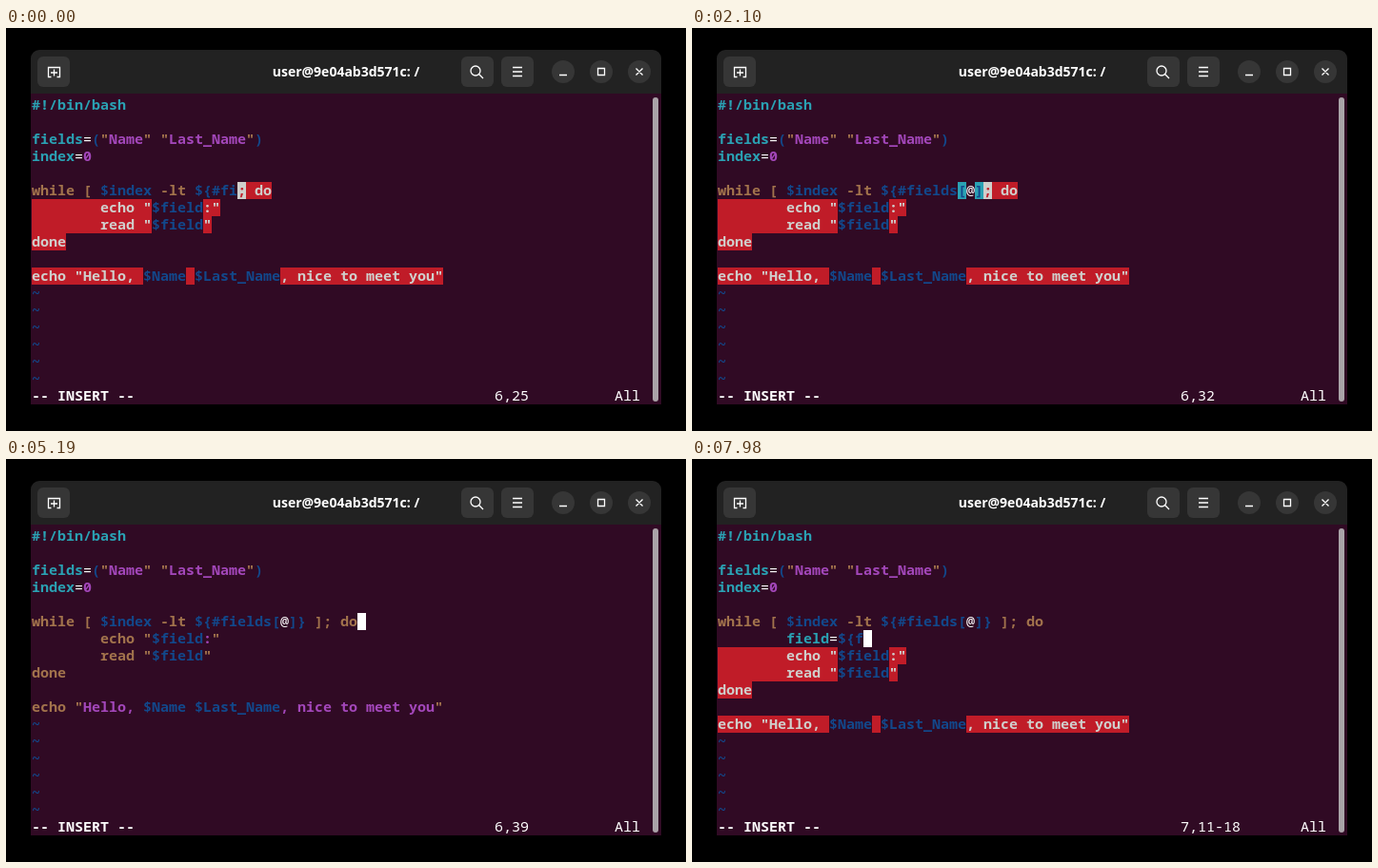
Animation, 714 px wide and 424 px high, one loop 8 s. Source, as an HTML page with a canvas:

```html
<!DOCTYPE html>
<html lang="en">
<head>
<meta charset="utf-8">
<title>Terminal editor</title>
<style>
html, body { margin: 0; width: 100%; height: 100%; overflow: hidden; background: #000; }
canvas { display: block; }
</style>
</head>
<body>
<canvas id="stage" width="714" height="424"></canvas>
<script>
const ctx = document.getElementById('stage').getContext('2d');
const LOOP = 8000, CW = 9, CH = 18, LEFT = 27, TOP = 72;
const BG = '#300a24', RED = '#c01c28', MATCH = '#2aa1b3';
const INK = { w: '#ffffff', y: '#a2734c', b: '#12488b', c: '#2aa1b3', m: '#a347ba', r: '#d0cfcc' };

// Colours of commands, quotes, string contents and "done" per highlighting state
const MODES = { err: 'rrrr', open: 'yymw', plain: 'wymw', ok: 'yymy' };
const FULL = '${#fields[@]} ]';

// time, highlighting, typed expression, cursor offset or text of the new line, matched columns
const KEYS = [
  [0, 'err', '${#fi', 0],
  [30, 'err', '${#fie', 0],
  [270, 'err', '${#fiel', 0],
  [510, 'err', '${#field', 0],
  [780, 'err', '${#fields', 0],
  [1050, 'open', '${#fields[', 0],
  [1320, 'open', '${#fields[@', 0],
  [1500, 'err', '${#fields[@]', 0, 28, 30],
  [2580, 'plain', '${#fields[@]}', 0, 20, 31],
  [3000, 'plain', '${#fields[@]} ', 0],
  [3660, 'ok', FULL, 0, 6, 33],
  [4500, 'ok', FULL, 1],
  [4620, 'ok', FULL, 2],
  [4740, 'ok', FULL, 3],
  [4860, 'ok', FULL, 4],
  [5340, 'ok', FULL, ''],
  [5910, 'ok', FULL, 'f'],
  [6030, 'ok', FULL, 'fi'],
  [6270, 'ok', FULL, 'fie'],
  [6510, 'ok', FULL, 'fiel'],
  [6780, 'ok', FULL, 'field'],
  [7080, 'ok', FULL, 'field='],
  [7320, 'ok', FULL, 'field=$'],
  [7590, 'err', FULL, 'field=${'],
  [7920, 'err', FULL, 'field=${f']
];

// Marked text: ^ plus a colour letter starts a new colour
function cells(text) {
  const list = [];
  for (const part of text.split('^').slice(1))
    for (const ch of part.slice(1)) list.push({ ch, ink: part[0] });
  return list;
}

function cell(row, col, ch, fg, bg, bold) {
  const x = LEFT + col * CW, y = TOP + row * CH;
  if (bg !== BG) {
    ctx.fillStyle = bg;
    ctx.fillRect(x, y, CW, CH);
  }
  ctx.font = (bold ? 'bold ' : '') + '15px "Noto Sans Mono", "DejaVu Sans Mono", monospace';
  ctx.textAlign = 'left';
  ctx.fillStyle = fg;
  ctx.fillText(ch, x, y + 14);
}

function print(row, col, text, bold) {
  [...text].forEach((ch, i) => cell(row, col + i, ch, INK.w, BG, bold));
}

function box(x, y, w, h, r, color) {
  ctx.fillStyle = color;
  ctx.beginPath();
  ctx.roundRect(x, y, w, h, r);
  ctx.fill();
}

function stroke(path, width = 1.3) {
  ctx.strokeStyle = '#ffffff';
  ctx.lineWidth = width;
  ctx.stroke(new Path2D(path));
}

function drawWindow() {
  ctx.fillStyle = '#000';
  ctx.fillRect(0, 0, 714, 424);
  box(26, 23, 662, 47, [9, 9, 0, 0], '#222222');
  ctx.fillStyle = BG;
  ctx.fillRect(26, 69, 662, 327);
  for (const x of [33, 478, 520]) box(x, 30, 34, 32, 6, '#363636');
  for (const x of [585, 625, 665]) box(x - 12, 34, 24, 24, 12, '#363636');
  stroke('M47.5 51.5H44.5V41.5H56.5V51.5H53.5M50.5 43.5V50.5M47 47H54');
  stroke('M498 45a5 5 0 1 0-10 0a5 5 0 1 0 10 0M496.8 48.8L501 53');
  stroke('M532 41.5H542M532 46H542M532 50.5H542');
  stroke('M581 49.5H589M621.5 42.5H628.5V49.5H621.5ZM661.5 42.5L668.5 49.5M668.5 42.5L661.5 49.5');
  box(679, 73, 6, 320, 3, '#aaa3a8');
  ctx.font = 'bold 14px "Noto Sans", "Open Sans", sans-serif';
  ctx.textAlign = 'center';
  ctx.fillStyle = '#ffffff';
  ctx.fillText('user@9e04ab3d571c: /', 357, 51);
}

function buildLines(mode, expr, fresh) {
  const [e, q, s, d] = MODES[mode];
  const tail = fresh !== null || mode === 'ok' ? '^y; do' : mode === 'err' ? '^r; do' : '^y;^w do';
  const typed = '^b' + expr.replace('@', '^w@^b').replace(' ]', '^y ]');
  const lines = [
    '^c#!/bin/bash', '',
    '^cfields^w=^b(^y"^mName^y" "^mLast_Name^y"^b)',
    '^cindex^w=^m0', '',
    '^ywhile [ ^b$index^y -lt ' + typed + tail,
    `^${e}        echo ^${q}"^b$field^${s}:^${q}"`,
    `^${e}        read ^${q}"^b$field^${q}"`,
    `^${d}done`, '',
    `^${e}echo ^${q}"^${s}Hello, ^b$Name^${s} ^b$Last_Name^${s}, nice to meet you^${q}"`
  ];
  if (fresh !== null) {
    const ink = fresh === 'fi' ? '^r' : '^w';
    lines.splice(6, 0, '^w        ' + ink + fresh.replace(/^(\w+)=/, (m, name) => `^c${name}^w=^b`));
  }
  while (lines.length < 17) lines.push('^b~');
  return lines;
}

function draw(t) {
  const [, mode, expr, extra, ...match] = KEYS.filter(k => k[0] <= t).pop();
  const fresh = typeof extra === 'string' ? extra : null;
  const row = fresh === null ? 5 : 6;
  const col = fresh === null ? 19 + expr.length + extra : 8 + fresh.length;
  const blinkOff = t >= 2280 && t < 2580;

  drawWindow();
  buildLines(mode, expr, fresh).forEach((line, r) => {
    const list = cells(line);
    if (r === row && col >= list.length) list[col] = { ch: ' ', ink: 'w' };
    list.forEach(({ ch, ink }, c) => {
      let fg = INK[ink], bg = ink === 'r' ? RED : BG;
      if (r === 5 && match.includes(c)) bg = MATCH;
      if (r === row && c === col && !blinkOff) [fg, bg] = [bg, fg];
      cell(r, c, ch, fg, bg, ink !== 'w');
    });
  });
  print(17, 0, '-- INSERT --', true);
  print(17, 54, fresh === null ? `6,${col + 1}` : `7,${fresh.length + 2}-${col + 1}`);
  print(17, 68, 'All');
}

const start = performance.now();
function tick() {
  draw((performance.now() - start) % LOOP);
  requestAnimationFrame(tick);
}
tick();
</script>
</body>
</html>
```
